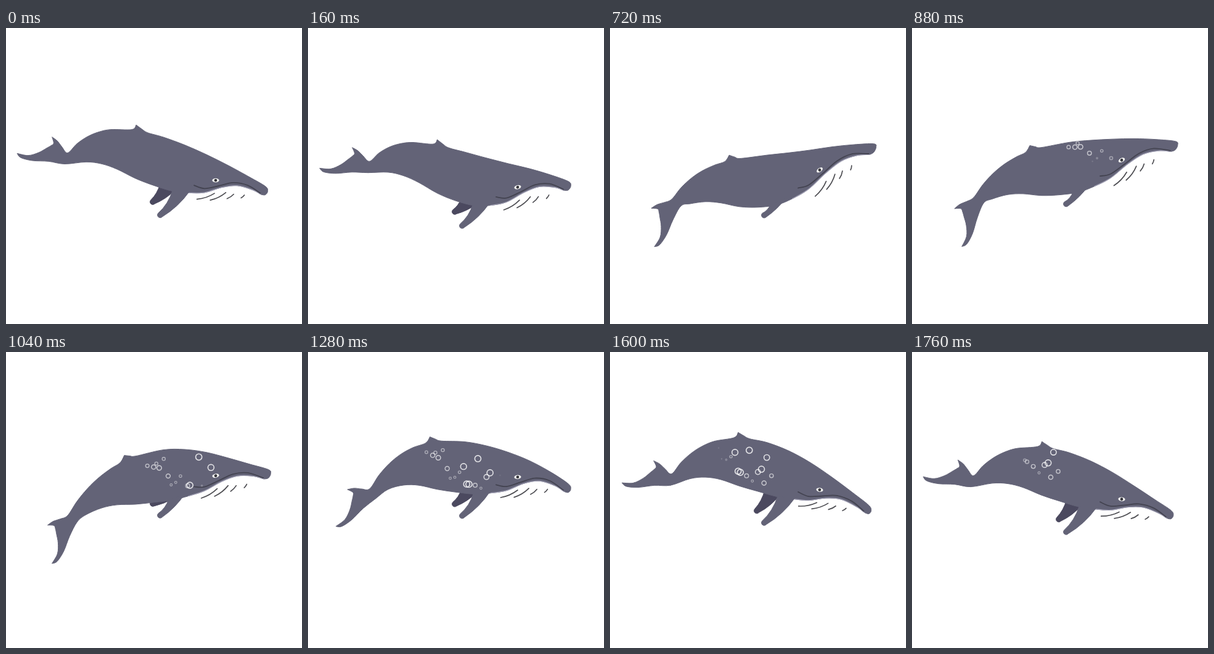
An HTML page with a canvas for the animation above (1840 ms loop, 480 px wide and 480 px high).

```html
<!DOCTYPE html>
<html lang="en">
<head>
<meta charset="utf-8">
<title>Swimming whale</title>
<style>
  html, body { margin: 0; width: 100%; height: 100%; overflow: hidden; background: #fff; }
  canvas { display: block; width: 100vmin; height: 100vmin; }
</style>
</head>
<body>
<canvas id="stage" width="480" height="480"></canvas>
<script>
const LOOP = 1840, STEP = 80, RAD = Math.PI / 180;
const SKIN = "#636377", SHADE = "#4b495f", LINE = "#434350", GROOVE = "#4d4d52";
const STEM = 100;
const ctx = document.getElementById("stage").getContext("2d");
ctx.lineCap = ctx.lineJoin = "round";

// Body depth below the back line, from jaw to tail: [x, depth]
const DEPTH = [[400, 18], [375, 25], [350, 41], [322, 63], [296, 75], [270, 82.5],
  [240, 83], [210, 78], [180, 65], [155, 53], [130, 40]];
// Rigid tail: [distance from the stem, drop], underside first, then the fluke edge
const TAIL = [[5, 18], [31, 13.5], [57, 12], [76, 7], [82, 0], [64, 3.5], [47, -1],
  [34, -8], [27, -12], [22.5, -16], [25, -26], [16, -19], [9, -9.5], [0, 0]];
const LIP = [[305, 59], [322, 56.5], [345, 41], [368, 24], [392, 15]];

let theta = 0;
const wave = (degrees, n = 1) => Math.cos(n * theta - degrees * RAD);

// Back line: a resting curve that pitches, arches and ripples
function spine(x) {
  const d = x - 200;
  const rest = 160 + 0.16 * d + 0.0005 * d * d + 89 * Math.exp((STEM - x) / 62);
  const pitch = 0.225 * (x - 258);
  const arch = 39 - 0.001 * (x - 210) ** 2;
  const ripple = 5.5 * Math.cos((x - 275) * RAD) * Math.min(1, (430 - x) / 90);
  return rest + pitch * wave(0) + arch * wave(90) + ripple * wave(90, 3);
}

const below = ([x, depth]) => [x, spine(x) + depth];

function tailPoints() {
  const a = (38.5 - 38 * wave(-5)) * RAD, c = Math.cos(a), s = Math.sin(a), y = spine(STEM);
  return TAIL.map(([u, v]) => [STEM - u * c + v * s, y + u * s + v * c]);
}

function backPoints() {
  const fin = 201 + 10 * wave(0), nose = snout();
  return [[115, 0], [132, 0], [150, 0], [170, 0], [fin - 7, -0.5], [fin, -9], [fin + 9, -4],
    [fin + 19, 0], [255, 0], [290, 0], [325, 0], [360, 0], [395, 0],
    [nose - 4, 0], [nose, 5.5], [nose - 4, 14], [nose - 11, 17.5]].map(below);
}

const snout = () => 427.5 + 4 * wave(140);

// Spline through the points, broken at the corners
function trace(pts, corners, closed) {
  const n = pts.length, at = i => pts[(i + n) % n];
  ctx.beginPath();
  ctx.moveTo(...pts[0]);
  for (let i = 0; i < (closed ? n : n - 1); i++) {
    const a = at(i), b = at(i + 1);
    const before = corners.includes(i) ? a : at(i - 1);
    const after = corners.includes((i + 1) % n) ? b : at(i + 2);
    ctx.bezierCurveTo(
      a[0] + (b[0] - before[0]) / 6, a[1] + (b[1] - before[1]) / 6,
      b[0] - (after[0] - a[0]) / 6, b[1] - (after[1] - a[1]) / 6, ...b);
  }
}

function paint(color) {
  ctx.fillStyle = color;
  ctx.fill();
  stroke(color, 1);
}

function stroke(color, width) {
  ctx.strokeStyle = color;
  ctx.lineWidth = width;
  ctx.stroke();
}

function flipper(left, right, tip, color) {
  const r = 4.4;
  const dx = tip[0] - (right[0] + left[0]) / 2, dy = tip[1] - (right[1] + left[1]) / 2;
  const angle = Math.atan2(dy, dx), ux = Math.cos(angle), uy = Math.sin(angle);
  const bend = Math.hypot(dx, dy) * 0.12;
  const mid = (p, q) => [(p[0] + q[0]) / 2 + uy * bend, (p[1] + q[1]) / 2 - ux * bend];
  const near = [tip[0] + uy * r, tip[1] - ux * r];
  const far = [tip[0] - uy * r, tip[1] + ux * r];
  ctx.beginPath();
  ctx.moveTo(...right);
  ctx.quadraticCurveTo(...mid(right, near), ...near);
  ctx.arc(...tip, r, angle - Math.PI / 2, angle + Math.PI / 2);
  ctx.quadraticCurveTo(...mid(far, left), ...left);
  ctx.closePath();
  paint(color);
}

function drawFarFlipper(swing) {
  flipper(below([247 + 4 * swing, 78]), below([272 + 2 * swing, 80]),
    [238, spine(250) + 93.5 + 18.5 * swing], SHADE);
}

function drawNearFlipper(swing) {
  flipper(below([266 + 6 * swing, 81]), below([292 + 7 * swing, 73]),
    [250, spine(270) + 112 + 13 * swing], SKIN);
}

function drawBody() {
  const belly = DEPTH.map(below), back = backPoints();
  trace([...tailPoints(), ...back, ...belly], [4, 10, 19, 30], true);
  paint(SKIN);
  trace([back[back.length - 1], ...belly.slice(0, 5)], [0, 5], false);
  stroke("#a5a4b8", 1.2);
}

function drawMouth() {
  trace([...LIP, [snout() - 12, 16]].map(below), [0, 5], false);
  stroke(LINE, 1.8);
}

// Eye and throat grooves turn together with the head
function drawFace() {
  const slope = Math.atan2(spine(350) - spine(330), 20);
  ctx.save();
  ctx.translate(340, spine(340) + 34.5);
  ctx.rotate(slope - 26 * RAD);
  for (const [rx, ry, color] of [[5.6, 3.2, "#f4f4f2"], [2.3, 2.3, "#26262c"], [0.6, 0.6, "#8c8c94"]]) {
    ctx.beginPath();
    ctx.ellipse(0, 0, rx, ry, 0, 0, 7);
    ctx.fillStyle = color;
    ctx.fill();
  }
  [30, 28, 13, 7].forEach((len, i) => {
    ctx.save();
    ctx.translate(-16 + 20 * i, 26);
    ctx.rotate((-19 - 7.5 * i) * RAD);
    ctx.beginPath();
    ctx.moveTo(-len / 2, 0);
    ctx.quadraticCurveTo(0, len * 0.12, len / 2, 0);
    stroke(GROOVE, 1.7);
    ctx.restore();
  });
  ctx.restore();
}

let seed = 11;
function random() {
  seed = seed * 16807 % 2147483647;
  return seed / 2147483647;
}

// A stream of bubbles, each passing the chest at its own time and height
const bubbles = Array.from({ length: 20 }, (_, i) => ({
  time: 680 + 40 * i + 30 * random(),
  y: 172 + 56 * random(),
  r: 1.8 + 3.4 * random(),
  born: 285 + 60 * random()
}));

function drawBubble({ time, y, r, born }, t) {
  const x = 285 + 0.155 * (time - t);
  const size = Math.min(1, (born - x) / 12, (x - 172) / 25);
  if (size <= 0) return;
  ctx.beginPath();
  ctx.arc(x, y - 0.004 * (x - 285) ** 2, r * size, 0, 7);
  stroke(`rgba(255,255,255,${Math.min(0.8, 0.2 + r * 0.13) * size})`, 1 + r * 0.14);
}

function draw(t) {
  theta = 2 * Math.PI * t / LOOP;
  const swing = wave(-45);
  ctx.fillStyle = "#fff";
  ctx.fillRect(0, 0, 480, 480);
  drawFarFlipper(swing);
  drawBody();
  drawNearFlipper(swing);
  drawMouth();
  drawFace();
  bubbles.forEach(b => drawBubble(b, t));
}

const start = performance.now();
function tick() {
  const t = (performance.now() - start) % LOOP;
  draw(Math.floor(t / STEP) * STEP);
  requestAnimationFrame(tick);
}
tick();
</script>
</body>
</html>
```
